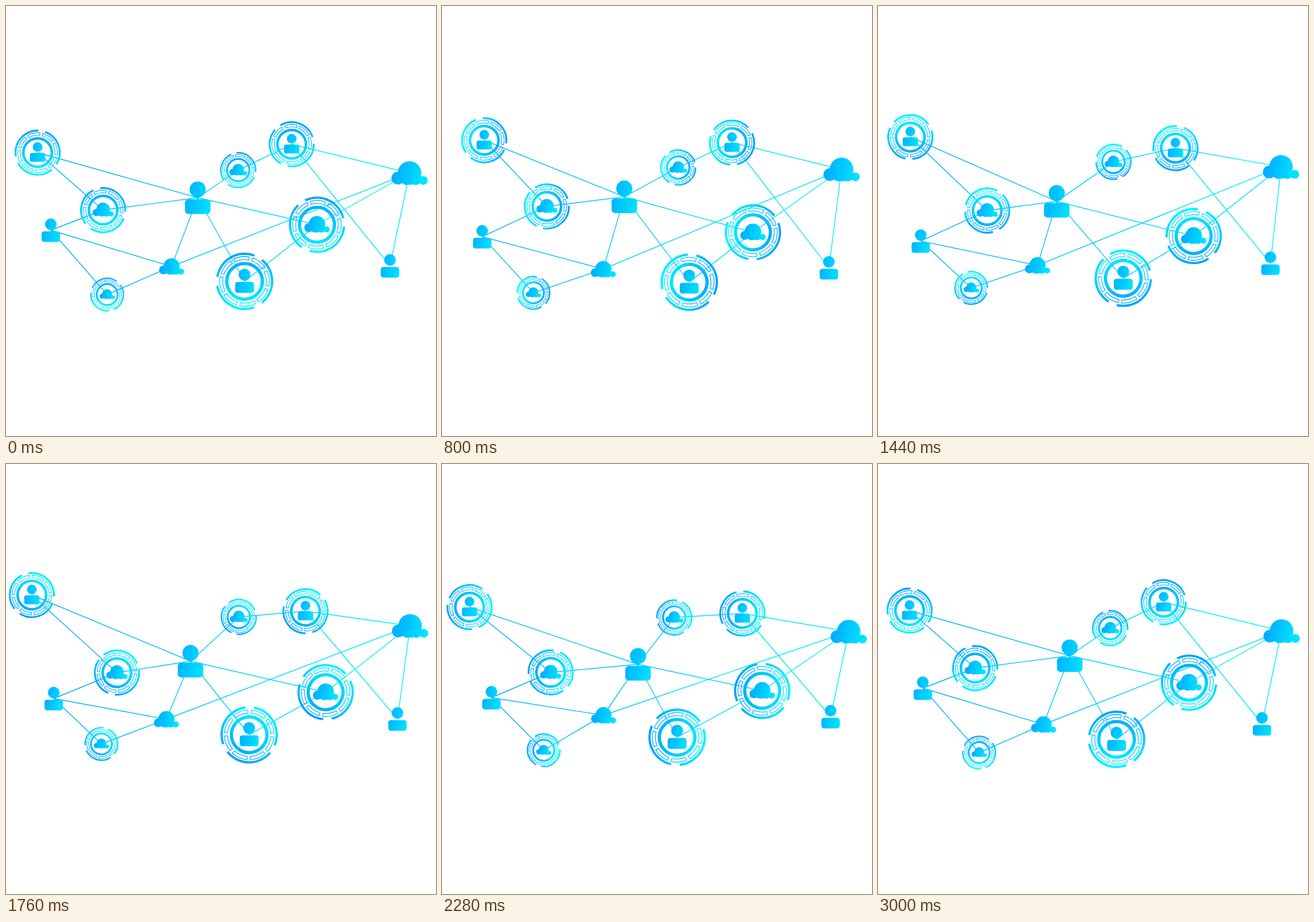
Recreate the animation shown at these times as an HTML page. Size 748 by 748 pixels, loop 3040 ms.

```html
<!DOCTYPE html>
<html lang="en">
<head>
<meta charset="utf-8">
<title>Cloud network</title>
<style>
  html, body { margin: 0; width: 100%; height: 100%; overflow: hidden; background: #fff; }
  svg { display: block; width: 100vw; height: 100vh; }
</style>
</head>
<body>
<svg id="stage" viewBox="0 0 748 748">
  <defs>
    <linearGradient id="lineInk" gradientUnits="userSpaceOnUse" x1="50" y1="0" x2="680" y2="0">
      <stop offset="0" stop-color="#00a8ff"/><stop offset="1" stop-color="#00f0ff"/>
    </linearGradient>
    <linearGradient id="iconInk" gradientUnits="userSpaceOnUse" x1="-28" y1="-6" x2="28" y2="6">
      <stop offset="0" stop-color="#00aaff"/><stop offset="1" stop-color="#00e6ff"/>
    </linearGradient>
    <linearGradient id="ringInk" gradientUnits="userSpaceOnUse" x1="0" y1="-48" x2="0" y2="48">
      <stop offset="0" stop-color="#00a2ff"/><stop offset="1" stop-color="#00f4ff"/>
    </linearGradient>
    <g id="person" fill="url(#iconInk)">
      <circle cy="-14.3" r="14"/>
      <rect x="-22.2" y="2.7" width="44.4" height="25.6" rx="6"/>
    </g>
    <g id="cloud" fill="url(#iconInk)">
      <circle r="20.5"/>
      <circle cx="-20.5" cy="9" r="11"/>
      <circle cx="-5" cy="12" r="9"/>
      <circle cx="11" cy="12" r="9"/>
      <circle cx="24" cy="13" r="7.6"/>
      <rect x="-21" y="6" width="43" height="12"/>
    </g>
  </defs>
</svg>
<script>
const STEP = 40, LOOP = 3040, TURN = 3000;
const times = [0, 440, 1160, 1760, 2280, 2720];

// x, y at each of the times
const paths = {
  A: [55, 255, 72, 239, 67, 231.5, 45, 228, 48, 249, 49, 260],
  B: [169, 355, 178, 351, 186, 349.5, 193, 363, 189, 362.5, 174, 357.5],
  C: [78, 390, 75, 394, 68, 408, 83, 408, 86, 406.5, 80.5, 395],
  D: [176, 502, 162, 501, 160.5, 495.5, 166, 487, 177, 498, 182, 503],
  E: [288, 453, 285, 456, 277, 456.5, 279, 444, 281, 437, 285, 446],
  F: [333.5, 333.5, 330, 329, 307, 337, 321, 343, 341, 348.5, 337.5, 342],
  G: [404, 285.5, 407, 284, 413, 276.5, 405, 266, 404, 267, 404, 280],
  H: [497, 240.5, 497.5, 238.5, 513, 240, 521, 256, 522.5, 260, 507, 248],
  I: [415, 479, 428, 482, 428, 477, 423, 471, 409, 475.5, 407.5, 477],
  J: [541, 380.5, 541, 385, 543, 401, 556, 397, 557, 394.5, 546, 385],
  K: [702, 290.5, 693.5, 288.5, 699.5, 280.5, 703, 281.5, 707.5, 291.5, 706.5, 292]
  ,
  L: [668, 452, 665, 457, 682, 451, 681, 443.5, 676, 439.5, 673, 444]
};

// icon, icon scale, ring radius, ring start angle
const parts = {
  A: ['person', .6, 40, 281],
  B: ['cloud', .58, 40, 13],
  C: ['person', .72],
  D: ['cloud', .42, 29.5, 75],
  E: ['cloud', .69],
  F: ['person', 1],
  G: ['cloud', .49, 31.5, 255],
  H: ['person', .6, 40, 110],
  I: ['person', .74, 50, 60],
  J: ['cloud', .7, 49, 115],
  K: ['cloud', 1],
  L: ['person', .72]
};
const links = 'AF AB BF BC CE CD DE EF EK FG GH HK HL FJ FI IJ JK KL'.split(' ');

const stage = document.getElementById('stage');

function add(parent, tag, attrs) {
  const el = document.createElementNS('http://www.w3.org/2000/svg', tag);
  for (const key in attrs) el.setAttribute(key, attrs[key]);
  return parent.appendChild(el);
}

function polar(r, deg) {
  const a = deg * Math.PI / 180;
  return `${(r * Math.cos(a)).toFixed(2)} ${(r * Math.sin(a)).toFixed(2)}`;
}

const arc = (r, from, to) => `M${polar(r, from)}A${r} ${r} 0 0 1 ${polar(r, to)}`;
const cell = (inner, outer, from, to) =>
  `${arc(outer, from, to)}L${polar(inner, to)}A${inner} ${inner} 0 0 0 ${polar(inner, from)}Z`;

// Ring of nominal radius 50; gaps line up at the start angle
function drawRing(parent, start, scale) {
  const ring = add(parent, 'g', { fill: 'none', stroke: 'url(#ringInk)' });
  let arcs = '', cells = '';
  for (let i = 0; i < 3; i++) arcs += arc(48, start + i * 120 + 9, start + i * 120 + 111);
  for (let i = 0; i < 8; i++) cells += cell(37.8, 43.2, start + i * 45 + 4, start + i * 45 + 41);
  add(ring, 'path', { d: arcs, 'stroke-width': 4 });
  add(ring, 'path', { d: cells, 'stroke-width': 1.3 / Math.sqrt(scale), 'stroke-linejoin': 'round' });
  add(ring, 'circle', { r: 31, 'stroke-width': 5.6 });
  return ring;
}

const lines = links.map(pair => ({
  pair, el: add(stage, 'line', { stroke: 'url(#lineInk)', 'stroke-width': 1.4 })
}));

const nodes = Object.entries(parts).map(([id, [icon, size, radius, start]]) => {
  const el = add(stage, 'g');
  const scale = radius / 50;
  const ring = radius ? drawRing(el, start, scale) : null;
  const drop = radius ? -1 : 0;
  add(el, 'use', { href: '#' + icon, transform: `translate(0 ${drop}) scale(${size})` });
  return { id, el, ring, scale };
});

// Smooth closed curve through the timed points
function along(path, axis, t) {
  const n = times.length;
  const at = i => times[(i + n) % n] + Math.floor(i / n) * TURN;
  const val = i => path[((i + n) % n) * 2 + axis];
  const slope = i => {
    const a = at(i) - at(i - 1), b = at(i + 1) - at(i);
    const before = (val(i) - val(i - 1)) / a, after = (val(i + 1) - val(i)) / b;
    return (before * b + after * a) / (a + b);
  };
  let i = n - 1;
  while (times[i] > t) i--;
  const span = at(i + 1) - at(i), u = (t - at(i)) / span, v = 1 - u;
  return v * v * (1 + 2 * u) * val(i) + u * u * (3 - 2 * u) * val(i + 1)
    + span * u * v * (v * slope(i) - u * slope(i + 1));
}

function draw(now) {
  const t = Math.floor((now % LOOP) / STEP) * STEP % TURN;
  const spot = {};
  for (const { id, el, ring, scale } of nodes) {
    const [x, y] = spot[id] = [0, 1].map(axis => along(paths[id], axis, t));
    el.setAttribute('transform', `translate(${x.toFixed(2)} ${y.toFixed(2)})`);
    if (ring) ring.setAttribute('transform', `rotate(${t / TURN * 360}) scale(${scale})`);
  }
  for (const { pair, el } of lines) {
    const [a, b] = [spot[pair[0]], spot[pair[1]]];
    el.setAttribute('x1', a[0]);
    el.setAttribute('y1', a[1]);
    el.setAttribute('x2', b[0]);
    el.setAttribute('y2', b[1]);
  }
}

const begin = performance.now();
function tick() {
  draw(performance.now() - begin);
  requestAnimationFrame(tick);
}
tick();
</script>
</body>
</html>
```
